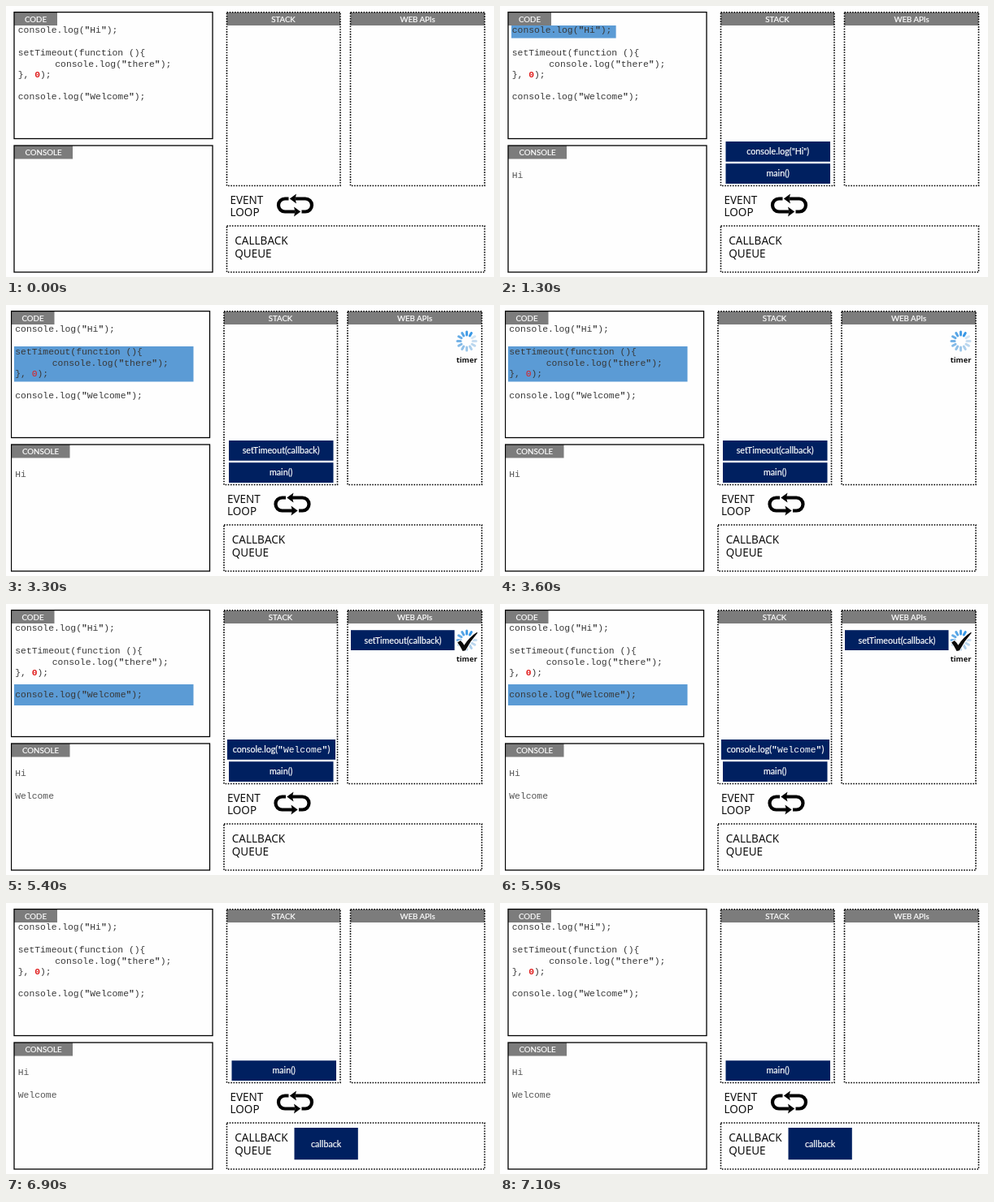
Animation of 600x334 px, one loop 8000 ms. Source, as an HTML page:

```html
<!DOCTYPE html>
<html lang="en">
<head>
<meta charset="utf-8">
<title>Event loop</title>
<style>
  html, body { margin: 0; width: 100%; height: 100%; overflow: hidden; background: #fefefe; }
  svg { display: block; width: 600px; height: 334px; }

  .solid { fill: none; stroke: #000; stroke-width: 1.3; }
  .dotted { fill: none; stroke: #000; stroke-width: 1.6; stroke-dasharray: 1.6 1.6; }
  .tab { fill: #7c7c7c; }
  .mark { fill: #5b9bd5; }
  .call { fill: #002060; }

  text { white-space: pre; }
  .head, .label {
    fill: #fff; stroke: #fff; stroke-width: .2;
    text-anchor: middle; font-family: Lato, Carlito, sans-serif;
  }
  .head { font-size: 9.7px; }
  .label { font-size: 10.7px; }
  .code, .mono { font-family: "Liberation Mono", "Courier New", monospace; font-size: 11.35px; }
  .mono { stroke: none; }
  .code { fill: #383838; }
  .out { fill: #555; }
  .b { font-weight: 700; }
  .title { font: 13.5px "Noto Sans", "Open Sans", sans-serif; fill: #111; }
  .timer { font: 700 9.3px "Open Sans", "Noto Sans", sans-serif; text-anchor: middle; fill: #111; }

  /* Scene cuts: 1300, 3300, 5400 and 6900 ms of 8000 */
  .stage, .zero, .hi, .wait, .bye, .queued, .main, .bye-out, .clock {
    animation: 8s step-end infinite;
  }
  .stage   { animation-name: shift; }
  .zero    { animation-name: thin; fill: #e01b1b; font-weight: 700; }
  .hi      { animation-name: hi; }
  .wait    { animation-name: wait; }
  .bye     { animation-name: bye; }
  .queued  { animation-name: queued; }
  .main    { animation-name: main; }
  .bye-out { animation-name: bye-out; }
  .clock   { animation-name: clock; }

  @keyframes shift {
    0%, 86.25%, 100% { transform: translateX(0); }
    41.25% { transform: translateX(-3.5px); }
  }
  @keyframes thin {
    0%, 67.5%, 100% { font-weight: 700; }
    41.25% { font-weight: 400; }
  }
  @keyframes hi {
    0%, 41.25%, 100% { visibility: hidden; }
    16.25% { visibility: visible; }
  }
  @keyframes wait {
    0%, 67.5%, 100% { visibility: hidden; }
    41.25% { visibility: visible; }
  }
  @keyframes bye {
    0%, 86.25%, 100% { visibility: hidden; }
    67.5% { visibility: visible; }
  }
  @keyframes clock {
    0%, 86.25%, 100% { visibility: hidden; }
    41.25% { visibility: visible; }
  }
  @keyframes queued {
    0% { visibility: hidden; }
    86.25%, 100% { visibility: visible; }
  }
  @keyframes main {
    0% { visibility: hidden; }
    16.25%, 100% { visibility: visible; }
  }
  @keyframes bye-out {
    0% { visibility: hidden; }
    67.5%, 100% { visibility: visible; }
  }
</style>
</head>
<body>
<svg viewBox="0 0 600 334">
  <g class="stage">
    <!-- Panels -->
    <g class="tab">
      <rect x="10" y="8" width="53" height="16"/>
      <rect x="10" y="172" width="72" height="16.5"/>
      <rect x="271.5" y="8" width="139.5" height="16"/>
      <rect x="423.5" y="8" width="165" height="16"/>
    </g>
    <g class="solid">
      <rect x="10" y="7.6" width="244" height="155.9"/>
      <rect x="10" y="172" width="244" height="156"/>
    </g>
    <g class="dotted">
      <rect x="271.5" y="7.7" width="139.5" height="213.8"/>
      <rect x="423.5" y="7.7" width="165" height="213.8"/>
      <rect x="271.5" y="271" width="317" height="57"/>
    </g>
    <g class="head">
      <text x="36.5" y="19.8">CODE</text>
      <text x="46" y="184.2">CONSOLE</text>
      <text x="341" y="19.8">STACK</text>
      <text x="506" y="19.8">WEB APIs</text>
    </g>

    <!-- Code -->
    <rect class="mark hi" x="14" y="24" width="128.6" height="15.6"/>
    <rect class="mark wait" x="13.5" y="51" width="220.5" height="43.5"/>
    <rect class="mark bye" x="13.5" y="99" width="220.5" height="26"/>
    <g class="code">
      <text x="14.8" y="33.4">console.log(<tspan class="b">"</tspan>Hi<tspan class="b">"</tspan>);</text>
      <text x="14.8" y="60.9">setTimeout(function (){</text>
      <text x="60.3" y="74.7">console.log(<tspan class="b">"</tspan>there<tspan class="b">"</tspan>);</text>
      <text x="14.8" y="88.1">}, <tspan class="zero">0</tspan>);</text>
      <text x="14.8" y="115.4">console.log(<tspan class="b">"</tspan>Welcome<tspan class="b">"</tspan>);</text>
    </g>

    <!-- Console output -->
    <text class="code out main" x="14.8" y="212">Hi</text>
    <text class="code out bye-out" x="14.8" y="239.5">Welcome</text>

    <!-- Stack -->
    <g class="main">
      <rect class="call" x="277.5" y="194.2" width="128.5" height="24.8"/>
      <text class="label" x="341.7" y="210.4">main()</text>
    </g>
    <g class="hi">
      <rect class="call" x="277.5" y="167" width="128.5" height="24.8"/>
      <text class="label" x="341.7" y="183.3">console.log("Hi")</text>
    </g>
    <g class="wait">
      <rect class="call" x="277.5" y="167" width="128.5" height="24.8"/>
      <text class="label" x="341.7" y="183.3">setTimeout(callback)</text>
    </g>
    <g class="bye">
      <rect class="call" x="275.5" y="167" width="133" height="24.8"/>
      <text class="label" x="342" y="183.3">console.log(<tspan class="mono"><tspan class="b">"</tspan>Welcome<tspan class="b">"</tspan></tspan>)</text>
    </g>

    <!-- Web APIs -->
    <g class="clock">
      <g id="spinner" transform="translate(570 44.5)" stroke-width="3" stroke-linecap="round"></g>
      <text class="timer" x="570" y="71">timer</text>
    </g>
    <g class="bye">
      <rect class="call" x="427.5" y="32.2" width="127.5" height="24.8"/>
      <text class="label" x="491.5" y="48.6">setTimeout(callback)</text>
      <path d="M558.6 47.4 L562.2 45 Q565 47.4 566.8 50.8 Q573.5 40.5 582.6 34.8 L583.2 35.8 Q574.5 45.5 568.4 57.2 L565 58 Q562.3 52 558.6 47.4Z" fill="#0a0a0a" stroke="#fefefe" stroke-width="2" paint-order="stroke"/>
    </g>

    <!-- Event loop -->
    <g class="title">
      <text x="275.5" y="244">EVENT</text>
      <text x="275.5" y="259.3">LOOP</text>
      <text x="281.3" y="294.2">CALLBACK</text>
      <text x="281.3" y="309.5">QUEUE</text>
    </g>
    <path d="M347.5 237.5 H343 a8 8 0 0 0 0 16 H355.5 M363.5 253.5 H368 a8 8 0 0 0 0 -16 H355.5" fill="none" stroke="#000" stroke-width="4.2"/>
    <path d="M357 231.5 L355.5 237.5 L357 243.5 L348.8 237.5Z M354 247.5 L355.5 253.5 L354 259.5 L362.2 253.5Z"/>

    <!-- Callback queue -->
    <g class="queued">
      <rect class="call" x="354.5" y="277" width="78.3" height="39.3"/>
      <text class="label" x="393.6" y="300.5">callback</text>
    </g>
  </g>
</svg>
<script>
  // Twelve spokes, fading counterclockwise from one o'clock
  const spinner = document.getElementById("spinner");
  for (let i = 0; i < 12; i++) {
    const spoke = document.createElementNS("http://www.w3.org/2000/svg", "line");
    const attrs = {
      y1: -7.5, y2: -11.5,
      transform: `rotate(${30 - i * 30})`,
      stroke: `hsl(207 ${78 - i * 2}% ${56 + i * 3}%)`
    };
    for (const name in attrs) spoke.setAttribute(name, attrs[name]);
    spinner.append(spoke);
  }
</script>
</body>
</html>
```
